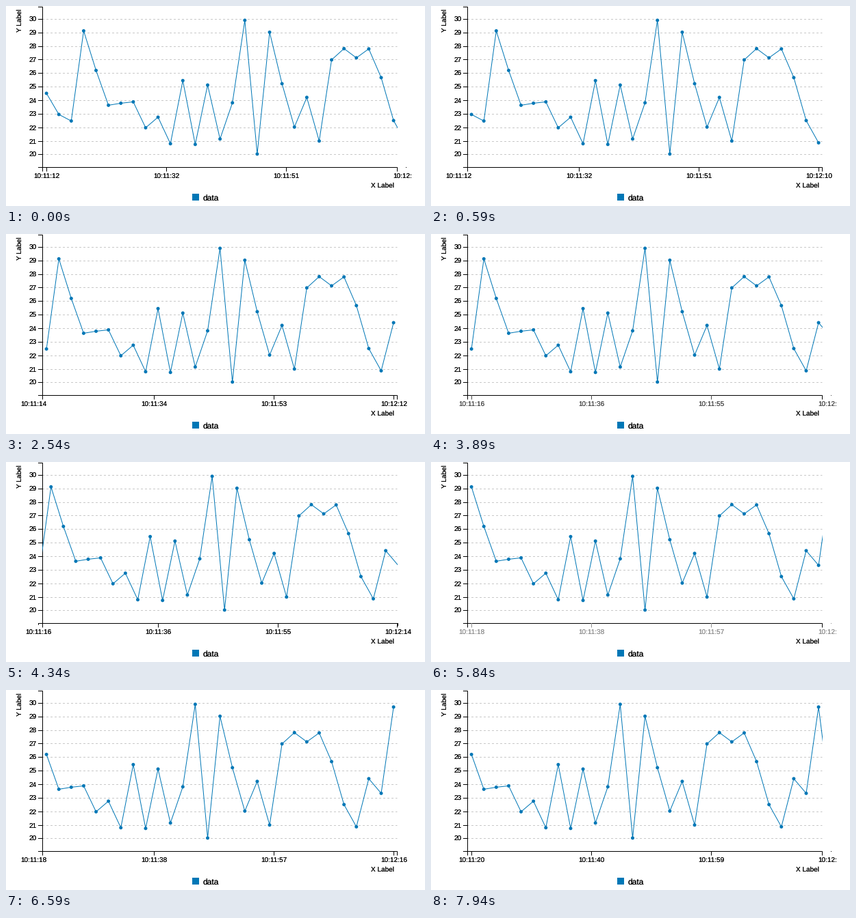
A matplotlib script that plays this animation: 612x293 px, repeating every 8 s.

```python
import math

import matplotlib.pyplot as plt
from matplotlib.animation import FuncAnimation
from matplotlib.patches import Rectangle

W, H, DPI = 612, 293, 100
PX = 72 / DPI
LOOP, STEP = 8000, 20
BLUE = "#0077b6"

LEFT, RIGHT, BASE = 53.5, 571.5, 236.5
FIRST, GAP, COUNT = 59.1, 507 / 28, 29
TICK_GAP = 175.1

# one cycle (ms): a point arrives, the labels fade in, the chart scrolls, rests
CYCLE, LEAD = 2000, 185
SCROLL, SETTLE, SPEED = 300, 700, 0.051
REFRESH = 150  # the picture is only renewed this often

SERIES = [24.53, 22.97, 22.49, 29.14, 26.22, 23.65, 23.8, 23.9, 21.99, 22.77,
          20.81, 25.47, 20.76, 25.14, 21.16, 23.83, 29.92, 20.05, 29.04,
          25.24, 22.04, 24.23, 21.01, 27, 27.83, 27.15, 27.81, 25.69, 22.52,
          20.88, 24.43, 23.35, 29.72, 22.4]

plt.rcParams.update({"font.family": "Liberation Sans", "text.hinting": "none"})
fig = plt.figure(figsize=(W / DPI, H / DPI), dpi=DPI, facecolor="white")
ax = fig.add_axes([0, 0, 1, 1])
ax.set_xlim(0, W)
ax.set_ylim(H, 0)
ax.axis("off")


def y_at(value):
    return 19.35 + (30 - value) * 19.85


def crisp(p):
    return math.floor(p) + 0.5


def stroke(xs, ys, color="black", **kw):
    kw.setdefault("solid_joinstyle", "miter")
    return ax.plot(xs, ys, color=color, lw=PX, snap=False,
                   solid_capstyle="butt", **kw)[0]


def label(x, y, text, size=10, **kw):
    # drawn twice to give the small type a firmer edge
    return [ax.text(x, y, text, fontsize=size * PX, va="baseline", **kw)
            for _ in range(2)]


def clip(arts, x0, x1, y0, y1):
    box = Rectangle((x0, y0), x1 - x0, y1 - y0, transform=ax.transData)
    for art in arts:
        art.set_clip_path(box)


def clock(seconds):
    return f"10:{11 + seconds // 60}:{seconds % 60:02d}"


# fixed parts
for v in range(20, 31):
    y = crisp(y_at(v))
    stroke([53, RIGHT], [y, y], "#c8c8c8", linestyle=(0, (3, 3)), zorder=1)
    stroke([47, LEFT], [y, y])
    label(45, y + 3.5, str(v), ha="right")
stroke([47, LEFT, LEFT, 47], [1.5, 1.5, BASE, BASE])
stroke([LEFT, LEFT, RIGHT, RIGHT], [BASE + 6, BASE, BASE, BASE + 6])
label(567, 266, "X Label", ha="right")
label(23, 4, "Y Label", ha="right", rotation=90, rotation_mode="anchor")
ax.add_patch(Rectangle((272, 275), 10, 10, fc=BLUE, lw=0))
label(288, 285, "data", 12, ha="left")

# moving parts
curve = stroke([], [], BLUE, zorder=3, solid_joinstyle="round")
dots = ax.scatter([0] * COUNT, [0] * COUNT, s=[(5 * PX) ** 2] * COUNT,
                  c=BLUE, lw=0, zorder=4)
ticks = [stroke([], []) for _ in range(4)]
stamps = [label(0, 253, "", ha="center", clip_on=True) for _ in range(4)]
clip([curve, dots], 53, 572, 0, BASE)
clip(ticks + sum(stamps, []), 22, 593, 230, 260)


def update(i):
    now = max(0, (i * STEP + 20) // REFRESH * REFRESH - 10)
    k, age = divmod(now + LEAD, CYCLE)
    done = age >= SETTLE
    shift = GAP if done else min(max(0, (age - SCROLL) * SPEED), GAP - 0.3)
    part = shift / GAP

    # the newest dot shows, and the oldest point goes, once the scroll settles
    pts = [(FIRST + n * GAP - shift, y_at(SERIES[k + n]))
           for n in range(done, COUNT + 1)]
    curve.set_data(*zip(*pts))
    dots.set_offsets(pts[:COUNT])

    shade = str(round(max(0, 0.7 - age / 180), 2))
    sizes = [6 * (1 - part), 6, 6, max(6 * part, 0.5)]
    for n, size in enumerate(sizes):
        x = FIRST + n * TICK_GAP - shift
        ticks[n].set_data([crisp(x)] * 2, [BASE - 0.5, BASE + size])
        ticks[n].set_visible(size > 0)
        ticks[n].set_color(shade)
        for text in stamps[n]:
            text.set_x(crisp(x))
            text.set_text(clock(12 + 2 * k + math.ceil(58 * n / 3)))
            text.set_color(shade)
    return [curve, dots, *ticks, *sum(stamps, [])]


anim = FuncAnimation(fig, update, frames=LOOP // STEP, interval=STEP,
                     repeat=True, repeat_delay=0, blit=False)
plt.show()
```
